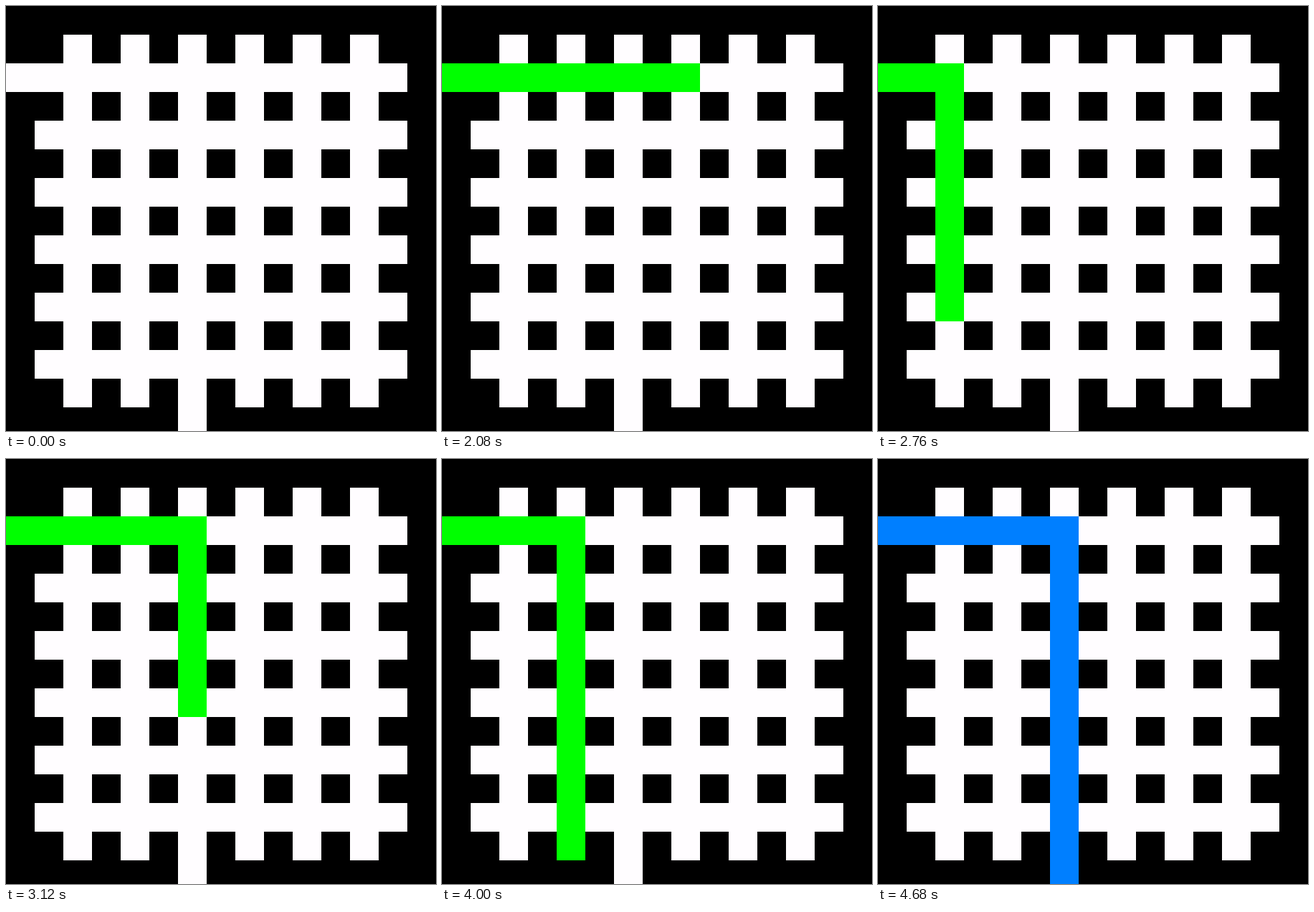
These frames come from a looping animation (600x593 px, 6880 ms). An HTML page:

```html
<!DOCTYPE html>
<html lang="en">
<head>
<meta charset="utf-8">
<title>Shortest path through a lattice maze</title>
<style>
  html, body { margin: 0; width: 100%; height: 100%; overflow: hidden; background: #000; }
  svg { display: block; width: 100%; height: 100%; }
  path { fill: none; stroke-width: 40; stroke-linecap: square; stroke-linejoin: miter; }
</style>
</head>
<body>
<svg viewBox="0 0 600 593" shape-rendering="crispEdges">
  <rect width="600" height="593" fill="#000"/>
  <path id="maze" stroke="#fffdff"/>
  <path id="route"/>
</svg>
<script>
const LOOP = 6880, START = 1320, TICK = 40;
const SIZE = 6, EXIT = 2;      // junctions per side, column of the exit
const NEAR = 60, FAR = 540;    // centres of the dead ends
const maze = document.getElementById('maze');
const route = document.getElementById('route');

const at = k => 100 + 80 * k;  // centre of corridor k
const from = d => 'M20 100' + d;

function mazePath() {
  let d = '';
  for (let k = 0; k < SIZE; k++) {
    d += `M${k ? NEAR : 20} ${at(k)}H${FAR}`;
    d += `M${at(k)} ${NEAR}V${k === EXIT ? 600 : FAR}`;
  }
  return d;
}

// Routes in the order a uniform-cost search takes them off its queue.
function searchRoutes() {
  const list = [];
  const add = d => list.push(from(d));
  const last = SIZE - 1, end = last + EXIT + 1;
  for (let level = 0; level <= end; level++) {
    for (let row = 0; row <= level; row++) {
      const col = level - row;
      if (row > last || col > last) continue;
      add(row ? `H${at(col)}V${at(row)}` : `H${at(col)}`);
      if (row && col) add(`H${at(col - 1)}V${at(row)}H${at(col)}`);
    }
    if (level === end) break;
    const over = level - last;
    if (over <= 0) add(`H${at(level)}V${NEAR}`);
    if (over >= 0) add(over ? `H${at(last)}V${at(over)}H${FAR}` : `H${FAR}`);
    if (level && over <= 0) add(`H${at(0)}V${at(level)}H${NEAR}`);
    if (over >= 0 && over !== EXIT) add(`H${at(over)}V${FAR}`);
  }
  add(`H${at(EXIT)}V600`);
  return list;
}

const routes = searchRoutes();
const goal = routes.length - 1;

// Pace of the search: [tick, route reached]
const pace = [[0, 0], [19, 12], [36, 27], [54, 42], [67, 55], [68, 55], [84, goal]];

function routeAt(tick) {
  for (let k = 1; k < pace.length; k++) {
    const [t0, n0] = pace[k - 1], [t1, n1] = pace[k];
    if (tick <= t1) return Math.round(n0 + (n1 - n0) * (tick - t0) / (t1 - t0));
  }
  return goal;
}

let shown;
function draw(time) {
  const tick = Math.floor((time - START) / TICK);
  const n = tick < 0 ? -1 : routeAt(tick);
  if (n === shown) return;
  shown = n;
  route.setAttribute('d', n < 0 ? '' : routes[n]);
  route.setAttribute('stroke', n === goal ? '#007fff' : '#00ff00');
}

maze.setAttribute('d', mazePath());
const begin = performance.now();
function frame() {
  draw((performance.now() - begin) % LOOP);
  requestAnimationFrame(frame);
}
frame();
</script>
</body>
</html>
```
